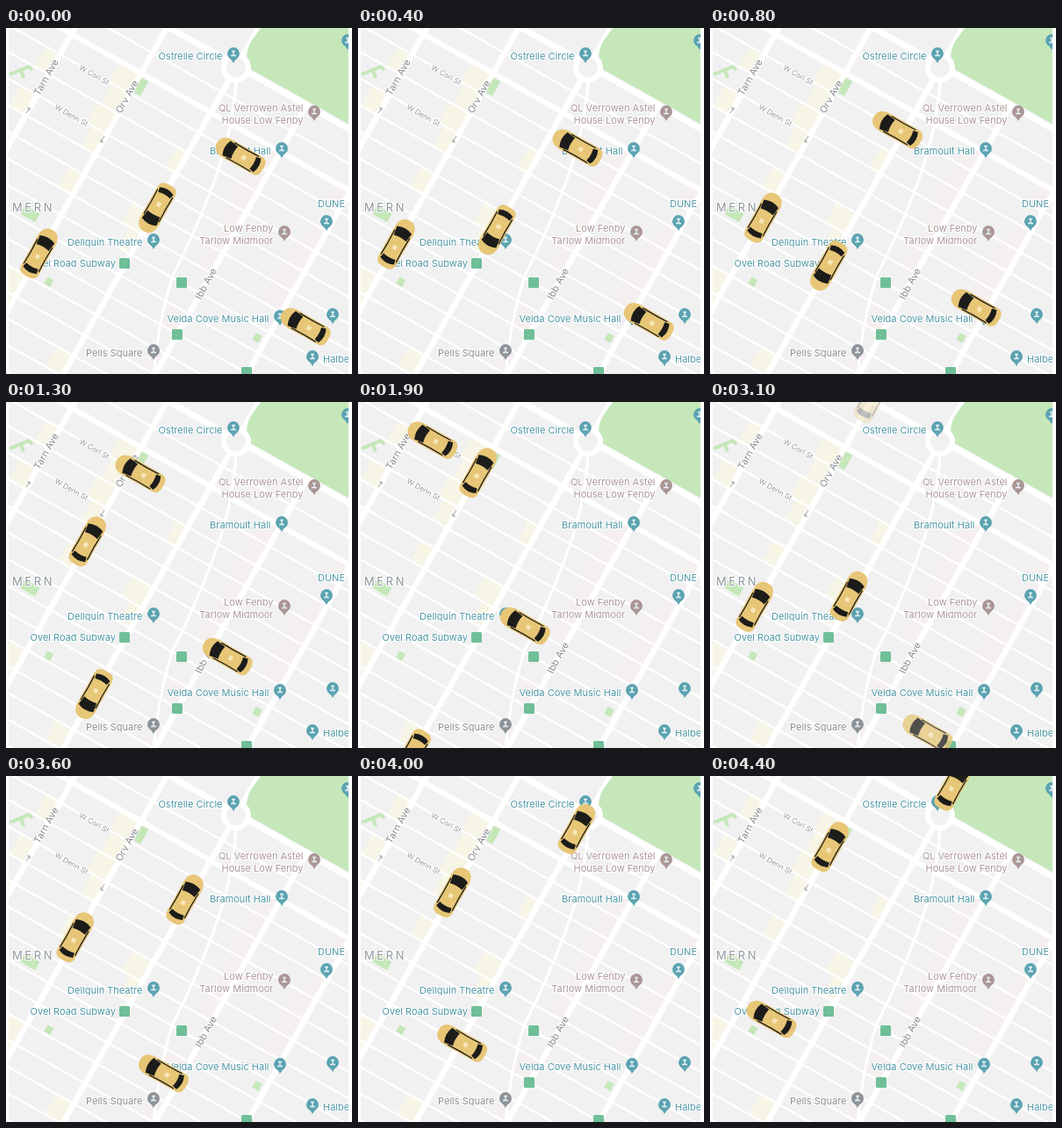
Animation of 394 by 394 pixels, one loop 4.5 s. Source, as an HTML page:

```html
<!DOCTYPE html>
<html lang="en">
<head>
<meta charset="utf-8">
<title>City map with taxis</title>
<style>
  html, body { margin: 0; width: 100%; height: 100%; overflow: hidden; background: #fff; }
  svg { display: block; width: 100vw; height: 100vh; }
  text {
    font: 11px Inter, Roboto, sans-serif;
    paint-order: stroke; stroke: #fff; stroke-width: 2px; stroke-linejoin: round;
  }
  .end { text-anchor: end; }
  .mid { text-anchor: middle; }
  .teal { fill: #4f97a6; }
  .mauve { fill: #ad9898; }
  .grey { fill: #8b8f92; }
  .ave { fill: #85898c; }
  .street { fill: #94979a; font-size: 8.4px; }
  .area { fill: #8d979c; font-size: 13px; letter-spacing: 2.6px; }
</style>
</head>
<body>
<svg viewBox="0 0 394 394">
  <defs>
    <clipPath id="frame"><rect x="3" width="387" height="394"/></clipPath>
    <g id="car">
      <path d="M-11.6-16C-11.6-26-7-30.5 0-30.5S11.6-26 11.6-16L11.4 21C11.2 28 8 30 0 30S-11.2 28-11.4 21Z" fill="#e7c677"/>
      <path d="M-9.6-18Q0-22.5 9.6-18L8-7.5Q0-9.5-8-7.5Z" fill="#1c1c1a"/>
      <path d="M-7.6 16.5Q0 18.5 7.6 16.5L9 22Q0 26.5-9 22Z" fill="#1c1c1a"/>
      <path d="M-9.8-13Q-9 4-9.8 19M9.8-13Q9 4 9.8 19" fill="none" stroke="#1c1c1a" stroke-width="1.3"/>
      <rect x="-2.5" y="2" width="5" height="5" fill="#f6e6b8"/>
    </g>
  </defs>
  <g clip-path="url(#frame)">
    <rect width="394" height="394" fill="#f1f1f2"/>
    <g id="grid" stroke="#fff"></g>
    <path d="M262 60Q258 120 236 178T190 282Q174 330 168 396" fill="none" stroke="#fff" stroke-width="3"/>
    <path d="M290 0H394V111.5L277 46Q270 30 280 14Z" fill="#c5e7b9"/>
    <circle cx="262" cy="45" r="14" fill="#f1f1f2" stroke="#fff" stroke-width="6"/>
    <path d="M4 53L26 44L30 48M17 48L20 57" fill="none" stroke="#c5e7b9" stroke-width="4"/>
    <path d="M23 97L27 91M24 91H27V94M112 123L108 130M108 127V130H111" fill="none" stroke="#9a9ea0"/>
    <g id="labels"></g>
  </g>
  <g id="cars"></g>
</svg>
<script>
const NS = "http://www.w3.org/2000/svg";
const TILT = 29.4;                    // the city grid, in degrees off north
const NORTH = TILT, WEST = TILT - 90, SOUTH = TILT - 180;

function add(parent, tag, attrs, text) {
  const el = document.createElementNS(NS, tag);
  for (const key in attrs) el.setAttribute(key, attrs[key]);
  if (text) el.textContent = text;
  (typeof parent === "string" ? document.getElementById(parent) : parent).append(el);
  return el;
}

let seed = 7;
const random = () => (seed = seed * 16807 % 2147483647) / 2147483647;

// In the tilted frame avenues are vertical and streets horizontal
const avenueX = k => 91 * k;
const streetY = k => 34.4 + 26.5 * k;
document.getElementById("grid").setAttribute("transform", `translate(78.5 0) rotate(${TILT})`);

const block = (x, y, width, height, fill) =>
  add("grid", "rect", { x, y, width, height, fill, stroke: "none" });
const road = (x1, y1, x2, y2, width) =>
  add("grid", "line", { x1, y1, x2, y2, "stroke-width": width });

for (let a = 0; a < 5; a++)
  for (let s = -1; s < 14; s++) {
    if (random() < 0.5) continue;
    const width = 14 + 14 * random();
    block(avenueX(a) - width, streetY(s), width, 26.5, a > 2 ? "#f5efef" : "#f6f5e6");
  }
for (let s = -2; s < 14; s++) road(-200, streetY(s), 500, streetY(s), s === -1 ? 6 : 2.4);
road(-200, -53, 500, -53, 7);
for (let a = 0; a < 5; a++) road(avenueX(a), -300, avenueX(a), 500, 6.5);

for (const [x, y, w, h] of [[94, 12, 9, 19], [50, 204, 19, 11], [112, 262, 8, 9], [350, 201, 8, 9]])
  block(x, y, w, h, "#c5e7b9");

const COLOURS = { teal: "#5ba3b1", mauve: "#ab9696", grey: "#8d9398" };

function label(text, x, y, cls, turn = 0) {
  add("labels", "text", { class: cls, transform: `translate(${x} ${y}) rotate(${turn})` }, text);
}

// A pin with its name, one or two lines, to the left
function place(x, y, tone, ...lines) {
  const pin = add("labels", "g", { transform: `translate(${x} ${y})` });
  add(pin, "path", { d: "M0 11Q-2 7-5 5A7 7 0 1 1 5 5Q2 7 0 11Z", fill: COLOURS[tone] });
  add(pin, "path", { d: "M-3 2.5H3M-2-2.5H2M0-2.5V2", stroke: "#e6f1f3", "stroke-width": 1.5 });
  const top = y + (lines.length > 1 ? 0 : 7);
  lines.forEach((line, i) => label(line, x - 12.5, top + 14 * i, tone + " end"));
}

function station(x, y) {
  add("labels", "rect", { x: x - 6, y: y - 6, width: 12, height: 12, rx: 1.5, fill: "#6fbf98" });
}

place(259, 29, "teal", "Ostrelle Circle");
place(351, 95, "mauve", "QL Verrowen Astel", "House Low Fenby");
place(314, 137, "teal", "Bramoult Hall");
place(168, 241, "teal", "Dellquin Theatre");
place(317, 232, "mauve", "Low Fenby", "Tarlow Midmoor");
place(312, 328, "teal", "Velda Cove Music Hall");
place(168, 367, "grey", "Pells Square");
place(365, 220, "teal");
place(349, 374, "teal");
place(372, 326, "teal");
place(389, 14, "teal");
station(135, 268);
station(200, 290);
station(195, 349);
station(274, 392);
label("Ovel Road Subway", 125, 272, "teal end");
label("DUNE S", 355, 204, "teal");
label("Halbe", 361, 381, "teal");
label("MERN", 7, 209, "area");
label("Tarn Ave", 49, 58, "ave mid", NORTH - 90);
label("Orv Ave", 141, 80, "ave mid", NORTH - 90);
label("Ibb Ave", 231, 293, "ave mid", NORTH - 90);
label("W Corl St", 99, 56, "street mid", TILT);
label("W Denn St", 73, 102, "street mid", TILT);

// A trip is a starting point and straight legs, each eased in and out
const leg = (heading, length, start, time) => ({ heading, length, start, time });
const northbound = { x: 38, y: 256.5, legs: [leg(NORTH, 300, 0, 3100)], hide: [2700, 3250] };
const trips = [
  { x: 267.5, y: 146, legs: [leg(WEST, 249, -100, 2700), leg(SOUTH, 60, 2500, 1500)], hide: [2600, 3000] },
  { x: 175.3, y: 199, legs: [leg(SOUTH, 278, -300, 3000)] },
  northbound,
  { ...northbound, delay: 2500, show: [-300, 0] },
  { x: 341, y: 339.5, legs: [leg(WEST, 217, 0, 2700), leg(NORTH, 260, 2850, 1700)] },
  { x: 282.3, y: 396.2, legs: [leg(WEST, 272, 2500, 2400)], show: [2850, 3180] }
];

const TURN = 500;
const ramp = (t, a, b) => Math.max(0, Math.min(1, (t - a) / (b - a)));
const ease = u => (1 - Math.cos(Math.PI * u)) / 2;

function pose({ x, y, legs }, t) {
  let turn = legs[0].heading;
  legs.forEach(({ heading, length, start, time }, i) => {
    const d = length * ease(ramp(t, start, start + time));
    const angle = heading * Math.PI / 180;
    x += d * Math.sin(angle);
    y -= d * Math.cos(angle);
    if (i) turn += (heading - legs[i - 1].heading) * ease(ramp(t, start - TURN / 2, start + TURN / 2));
  });
  return `translate(${x.toFixed(2)} ${y.toFixed(2)}) rotate(${turn.toFixed(2)})`;
}

for (const trip of trips) trip.el = add("cars", "use", { href: "#car" });

const LOOP = 4500, STEP = 100;
const begin = performance.now();

function draw() {
  const now = Math.floor((performance.now() - begin) % LOOP / STEP) * STEP;
  for (const trip of trips) {
    const { delay = 0, show, hide, el } = trip, t = now - delay;
    el.setAttribute("transform", pose(trip, t));
    el.setAttribute("opacity", (show ? ramp(t, ...show) : 1) * (hide ? 1 - ramp(t, ...hide) : 1));
  }
  requestAnimationFrame(draw);
}
draw();
</script>
</body>
</html>
```
